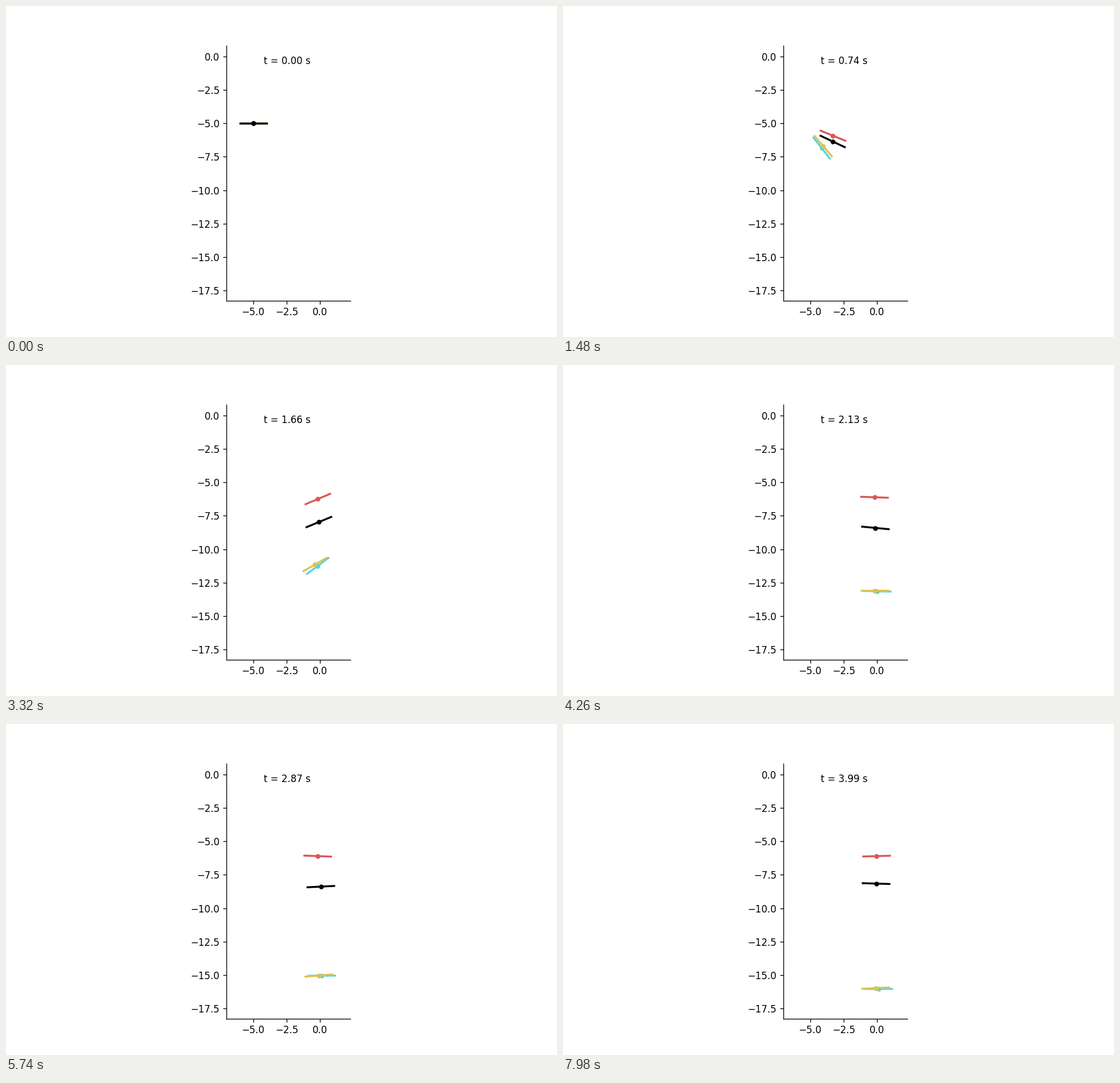
A matplotlib script for the animation above (8 s loop, 960 px wide and 576 px high).

```python
import numpy as np
import matplotlib.pyplot as plt
from matplotlib.animation import FuncAnimation

FRAMES, INTERVAL = 400, 20
DT = 0.01
GRAVITY = 9.81
X0 = Y0 = -5.0
T = np.arange(FRAMES) * DT

plt.rcParams["font.family"] = "DejaVu Sans"


def approach(dist, tau, k):
    """Travel `dist` from rest and settle after roughly `tau` seconds."""
    return dist * (1 - np.exp(-((T / tau) ** k)))


def bump(height, peak, width):
    return height * np.exp(-(((T - peak) / width) ** 2))


def sway(amp, omega, peak):
    """Slow hover drift that fades in once the craft has arrived."""
    return amp * np.cos(omega * (T - peak)) / (1 + np.exp(-6 * (T - 1.7)))


def thrust_tilt(x, y):
    """Tilt that points the thrust along the needed acceleration."""
    ax_, ay = (np.gradient(np.gradient(p, DT), DT) for p in (x, y))
    lift = np.maximum(GRAVITY + ay, 4)
    return -np.arctan2(ax_, lift) * (1 - np.exp(-((T / 0.1) ** 2)))


class Craft:
    def __init__(self, ax, color, run, drift, fall, dip=(0, 1, 1)):
        self.x = X0 + approach(*run) + sway(*drift)
        self.y = Y0 - approach(*fall) - bump(*dip) + bump(*dip)[0]
        self.tilt = thrust_tilt(self.x, self.y)
        self.arm, = ax.plot([], [], color=color, lw=2)
        self.hub, = ax.plot([], [], "o", color=color, ms=4)

    def pose(self, i):
        x, y = self.x[i], self.y[i]
        dx, dy = np.cos(self.tilt[i]), np.sin(self.tilt[i])
        self.arm.set_data([x - dx, x + dx], [y - dy, y + dy])
        self.hub.set_data([x], [y])
        return [self.arm, self.hub]


fig, ax = plt.subplots(figsize=(8, 4.8), dpi=120)
ax.set_aspect("equal")
ax.set_xlim(-7.01, 2.27)
ax.set_ylim(-18.25, 0.81)
ax.set_xticks([-5, -2.5, 0])
ax.set_yticks(np.arange(-17.5, 0.1, 2.5))
ax.spines[["top", "right"]].set_visible(False)

clock = ax.text(0.3, 0.928, "", transform=ax.transAxes)
crafts = [
    Craft(ax, "#57d3db", run=(5.12, 1.22, 3.41), drift=(0.12, 2.7, 3.42),
          fall=(11.2, 1.852, 1.87)),
    Craft(ax, "#dbc257", run=(4.87, 1.186, 3.19), drift=(0.035, 5.3, 2.87),
          fall=(11.1, 1.855, 1.95)),
    Craft(ax, "#db5757", run=(4.88, 0.995, 2.86), drift=(0.11, 2.5, 3.72),
          fall=(1.1, 0.67, 2), dip=(0.34, 1.2, 0.5)),
    Craft(ax, "black", run=(5.0, 1.012, 2.86), drift=(0.13, 2.9, 3.25),
          fall=(3.15, 1.066, 1.616), dip=(0.42, 2.3, 0.8)),
]


def update(i):
    clock.set_text(f"t = {i * DT:.2f} s")
    return [clock] + [a for c in crafts for a in c.pose(i)]


anim = FuncAnimation(
    fig, update, frames=FRAMES, interval=INTERVAL,
    init_func=lambda: update(0), repeat=True, repeat_delay=0, blit=False,
)
plt.show()
```
